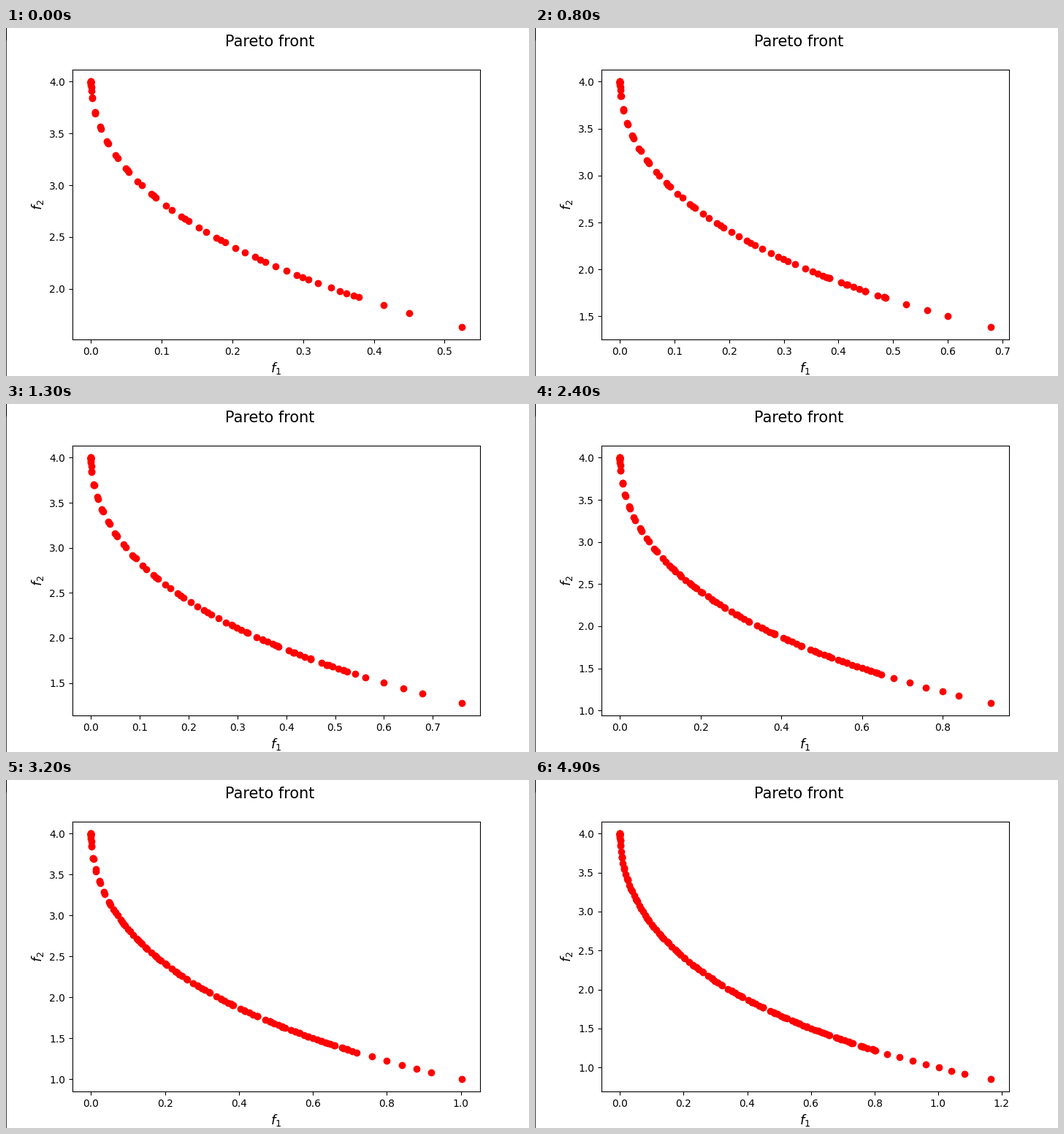
These frames come from a looping animation (716x476 px, 5300 ms). A matplotlib script:

```python
import numpy as np
import matplotlib.pyplot as plt
from matplotlib.animation import FuncAnimation
from matplotlib.patches import Rectangle

W, H, DPI = 716, 476, 100
STEP, LOOP = 100, 5300
STARTS = [0, 300, 800, 1300, 1800, 2400, 3200, 4000, 4900]

# right end of the front: two seeds, then one new end per generation
TIPS = np.array([.3784, .4495, .524, .6, .6785, .759, .84, .919, 1.002,
                 1.083, 1.165])


def lattice(k, bend):
    """f1 of the k-th cluster: quadratic at first, then steps of 0.04."""
    return .04 * (np.hypot(k, bend) - bend)


def front(gen):
    """All f1 values on the front at a generation."""
    k = np.arange(1, 40)
    half = np.arange(max(24 - 3 * gen, 0), 40) + .5  # gaps fill leftwards
    body = np.concatenate([
        lattice(k, 14),
        lattice(k, 12.8),
        lattice(k[1::2], 13.4),
        lattice(half, 13.1),
    ])
    body = body[body < .38 + .055 * gen]
    tips = TIPS[:gen + 3]
    between = (tips[:-2] + tips[1:-1]) / 2
    start = np.geomspace(1e-4, .023, 12) ** 2
    return np.concatenate([[0], start, body, between, tips])


fig = plt.figure(figsize=(W / DPI, H / DPI), dpi=DPI, facecolor="white")
ax = fig.add_axes([91 / W, 49.8 / H, 558 / W, 369.6 / H])
fig.text(361 / W, 1 - 8.6 / H, "Pareto front", size=15, ha="center", va="top")
ax.set_xlabel("$f_1$", size=13)
ax.set_ylabel("$f_2$", size=13)
dots, = ax.plot([], [], "ro")

# window border along the left edge, darker at the top
for height, color in [(H, "#404040"), (17, "black")]:
    fig.add_artist(Rectangle((0, H - height), 1, height, transform=None,
                             fc=color, lw=0))


def update(i):
    gen = np.searchsorted(STARTS, i * STEP, side="right") - 1
    f1 = front(gen)
    dots.set_data(f1, (np.sqrt(f1) - 2) ** 2)
    ax.relim()
    ax.autoscale_view()
    return dots,


anim = FuncAnimation(fig, update, frames=LOOP // STEP, interval=STEP,
                     repeat=True, repeat_delay=0)
plt.show()
```
